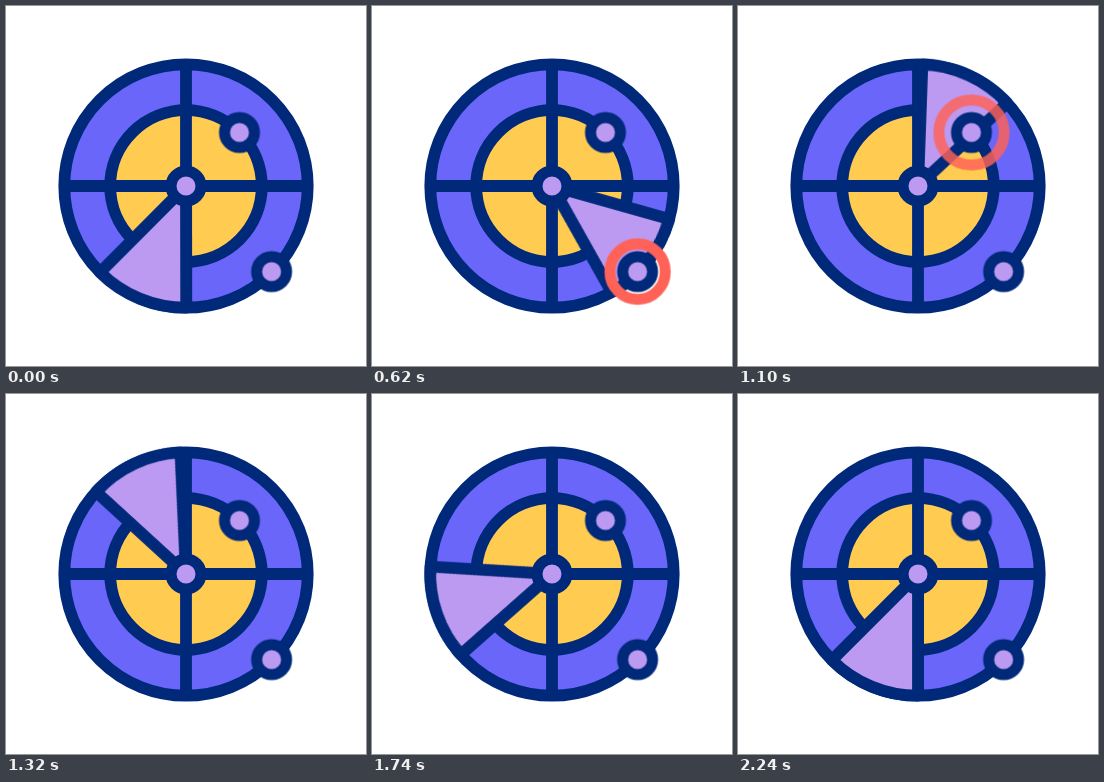
These frames come from a looping animation (360 by 360 pixels, 2400 ms). An HTML page:

```html
<!DOCTYPE html>
<html lang="en">
<head>
<meta charset="utf-8">
<title>Radar</title>
<style>
  :root {
    --navy: #002979;
    --purple: #6a66fa;
    --yellow: #ffcb50;
    --pink: #bd9af2;
    --coral: #ff6257;
    --loop: 2400ms;
  }
  html, body { margin: 0; height: 100%; overflow: hidden; background: #fff; }
  svg { display: block; width: 100%; height: 100%; }
  .line { stroke: var(--navy); stroke-width: 11.8; stroke-linejoin: round; }
  .disc { fill: var(--purple); }
  .core { fill: var(--yellow); }
  .dot, .beam { fill: var(--pink); }
  .dot { r: 15px; stroke-width: 11px; }

  .beam { animation: sweep var(--loop) -20ms infinite; }
  .ping {
    r: 15px;
    fill: none;
    stroke: var(--coral);
    stroke-width: 11;
    opacity: 0;
    animation: grow var(--loop) var(--at) infinite, fade var(--loop) var(--at) linear infinite;
  }

  /* 2260 ms turn, then rest */
  @keyframes sweep {
    0% { transform: rotate(0deg); animation-timing-function: cubic-bezier(.3, 0, .7, 1); }
    94.1667%, 100% { transform: rotate(-360deg); }
  }
  /* 400 ms pulse */
  @keyframes grow {
    0% { r: 15px; animation-timing-function: cubic-bezier(.3, 0, .7, 1); }
    16.6667%, 100% { r: 50px; }
  }
  @keyframes fade {
    0%, 6.6667% { opacity: 1; }
    16.6667%, 100% { opacity: 0; }
  }
</style>
</head>
<body>
<svg viewBox="0 0 360 360">
  <g transform="translate(180 180)">
    <circle class="line disc" r="121.7"/>
    <circle class="line core" r="75.8"/>
    <path class="line" d="M-121 0H121M0-121V121"/>
    <path class="line beam" d="M0 0V121.7A121.7 121.7 0 0 1-86.05 86.05Z"/>
    <circle class="line dot"/>
    <g transform="translate(85.6 85.6)">
      <circle class="ping" style="--at: 460ms"/>
      <circle class="line dot"/>
    </g>
    <g transform="translate(53.5 -53.5)">
      <circle class="ping" style="--at: 900ms"/>
      <circle class="line dot"/>
    </g>
  </g>
</svg>
</body>
</html>
```
